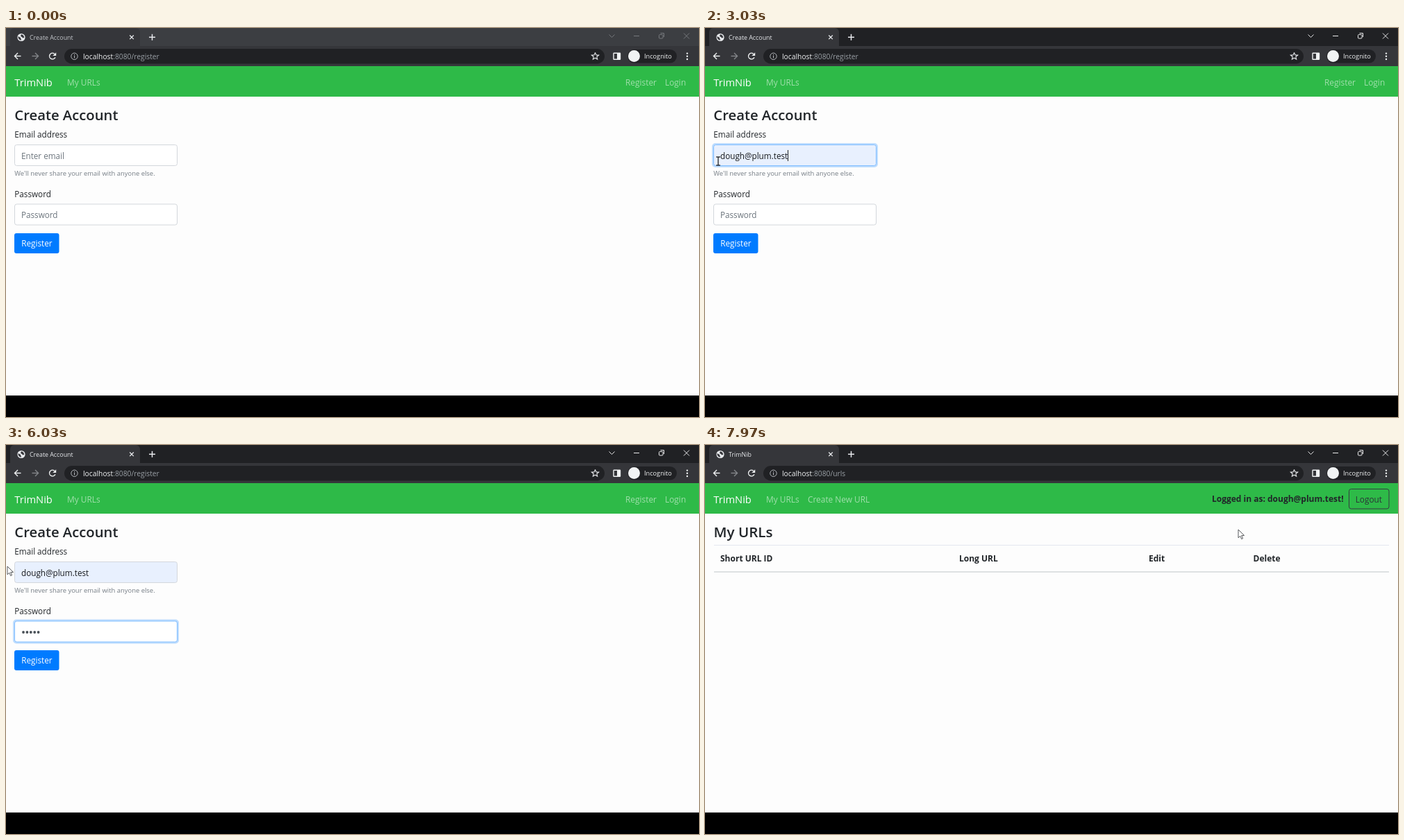
An HTML page with a canvas that plays this animation: 998x561 px, repeating every 8000 ms.

```html
<!DOCTYPE html>
<html lang="en">
<head>
<meta charset="utf-8">
<title>Create Account</title>
<style>
html, body { margin: 0; width: 100%; height: 100%; overflow: hidden; background: #000; }
canvas { display: block; }
</style>
</head>
<body>
<canvas id="stage" width="998" height="561"></canvas>
<script>
const ctx = document.getElementById('stage').getContext('2d');
const LOOP = 8000;
const BRAND = 'TrimNib';
const EMAIL = 'dough@plum.test';
const FONT = '"Open Sans", "Noto Sans", sans-serif';
const INK = '#212529', WHITE = '#fff', BAR = '#35363a', DARK = '#202124';
const BODY = 11.7;

// Moments of the story, in ms
const APPEAR = 30, CLICK_EMAIL = 1100, FILL = 2900, CLICK_PASS = 3580;
const EMAIL_KEYS = [1330, 1400];
const PASS_KEYS = [4570, 4770, 4900, 5030, 5120];
const SUBMIT = 6330, COMMIT = 6530, LOADED = 6840;

// Pointer stops: time, x, y
const PATH = [
  [30, 5, 201], [170, 8, 199], [1030, 8, 199], [1170, 24, 185], [1500, 25, 183],
  [2370, 25, 183], [2600, 19, 192], [3330, 19, 192], [3570, 35, 272], [3620, 36, 271],
  [3770, 36, 232], [4130, 2, 175], [6030, 2, 175], [6270, 40, 313], [6330, 40, 313],
  [6600, 197, 103], [6850, 230, 120], [6870, 230, 120], [7090, 420, 140],
  [7660, 926, 84], [7690, 926, 84], [7970, 768, 122]
];

const clamp = v => Math.max(0, Math.min(1, v));
const fade = (t, start, len) => clamp((t - start) / len);
const ease = p => p * p * (3 - 2 * p);
const mix = (a, b, p) => a.map((v, i) => Math.round(v + (b[i] - v) * p));
const rgb = c => `rgb(${c.join()})`;

function text(str, x, y, size, color, weight = 400) {
  ctx.font = `${weight} ${size}px ${FONT}`;
  ctx.fillStyle = color;
  ctx.fillText(str, x, y);
  return ctx.measureText(str).width;
}

function rect(x, y, w, h, color) {
  ctx.fillStyle = color;
  ctx.fillRect(x, y, w, h);
}

function box(x, y, w, h, r, fill, stroke, width = 1) {
  ctx.beginPath();
  ctx.roundRect(x, y, w, h, r);
  if (fill) { ctx.fillStyle = fill; ctx.fill(); }
  if (stroke) { ctx.strokeStyle = stroke; ctx.lineWidth = width; ctx.stroke(); }
}

function disc(x, y, r, color) {
  ctx.beginPath();
  ctx.arc(x, y, r, 0, 7);
  ctx.fillStyle = color;
  ctx.fill();
}

function arc(x, y, r, from, to, color, width) {
  ctx.beginPath();
  ctx.arc(x, y, r, from, to);
  ctx.strokeStyle = color;
  ctx.lineWidth = width;
  ctx.stroke();
}

// Flat list of coordinates
function trace(p) {
  ctx.beginPath();
  for (let i = 0; i < p.length; i += 2) ctx.lineTo(p[i], p[i + 1]);
}

function line(color, width, ...p) {
  trace(p);
  ctx.strokeStyle = color;
  ctx.lineWidth = width;
  ctx.stroke();
}

function shape(color, ...p) {
  trace(p);
  ctx.closePath();
  ctx.fillStyle = color;
  ctx.fill();
}

function cross(x, y, r, color, width) {
  line(color, width, x - r, y - r, x + r, y + r);
  line(color, width, x - r, y + r, x + r, y - r);
}

function backArrow(x, y, dir, color) {
  line(color, 1.4, x - 4.5, y, x + 4.5, y);
  line(color, 1.4, x, y - 4.5, x + dir * 4.5, y, x, y + 4.5);
}

function globe(x, y) {
  disc(x, y, 5.6, '#e8eaed');
  shape(BAR, x - 4.4, y - 1.5, x - 1, y + .4, x - .6, y + 2, x + .2, y + 4.3, x - 2.4, y + 3.4, x - 4.4, y + 1);
  shape(BAR, x, y - 4.4, x + 3, y - 3, x + 4.3, y, x + 2.6, y + 1, x + .8, y - .6, x - 1, y - 1.8);
}

function star(x, y) {
  const p = [];
  for (let i = 0; i <= 10; i++) {
    const r = i % 2 ? 2.4 : 5.4, a = i * Math.PI / 5 - Math.PI / 2;
    p.push(x + r * Math.cos(a), y + r * Math.sin(a));
  }
  line('#e8eaed', 1.1, ...p);
}

function browser(t) {
  const active = fade(t, CLICK_EMAIL, 150);
  const loading = t >= SUBMIT && t < LOADED;
  const icon = rgb(mix([118, 121, 125], [235, 235, 236], active));
  const label = rgb(mix([196, 199, 203], [232, 234, 237], active));

  rect(0, 0, 998, 27, rgb(mix([60, 62, 66], [32, 33, 36], active)));
  box(6, 0, 187, 30, [6, 6, 0, 0], BAR);
  rect(0, 26, 998, 29, BAR);

  if (loading) {
    const a = (t - SUBMIT) / 140 + 2;
    arc(22, 13.5, 5, a, a + 1.9, '#9aa0a6', 1.4);
  } else globe(22, 13.5);
  const title = t < COMMIT ? 'Create Account' : t < LOADED ? 'localhost:8080/urls' : BRAND;
  text(title, 34, 16.7, 8.85, label);
  cross(181, 13.3, 2.8, '#e8eaed', 1.3);
  line('#e8eaed', 1.5, 206, 13.3, 215, 13.3);
  line('#e8eaed', 1.5, 210.5, 8.8, 210.5, 17.8);

  line(icon, 1, 868.5, 9.5, 872.5, 13.5, 876.5, 9.5);
  line(icon, 1, 904, 11.5, 912, 11.5);
  box(940.5, 9.5, 5.5, 5.5, 1, null, icon);
  line(icon, 1, 942.5, 7.5, 947.5, 7.5, 947.5, 13);
  cross(980, 11.5, 4, icon, 1);

  backArrow(17, 40.5, -1, '#f1f3f4');
  backArrow(42, 40.5, 1, '#85878b');
  if (loading) cross(67, 40.5, 4, '#f1f3f4', 1.6);
  else {
    arc(67, 40.5, 4.4, .45, 5.4, '#f1f3f4', 1.4);
    shape('#f1f3f4', 72.2, 35.2, 72.2, 40, 67.4, 40);
  }

  box(84, 30, 778, 21.5, 10.7, DARK);
  arc(98.5, 40.8, 4.7, 0, 7, '#b6b9be', 1);
  rect(98, 40, 1.1, 3.4, '#b6b9be');
  rect(98, 38, 1.1, 1.2, '#b6b9be');
  const w = text('localhost', 111, 44.5, 10.3, '#f1f3f4');
  text(t < COMMIT ? ':8080/register' : ':8080/urls', 111 + w, 44.5, 10.3, '#9aa0a6');
  star(848.5, 40.8);
  box(875, 36.3, 9.5, 9, .5, null, '#f1f3f4', 1.4);
  rect(880, 36, 4.5, 9.5, '#f1f3f4');
  box(895, 31, 71, 19.5, 9.7, DARK);
  disc(904.5, 40.5, 8.5, '#f1f3f4');
  text('Incognito', 919, 43.9, 9.2, '#f1f3f4');
  for (const y of [36.6, 40.8, 45]) disc(981, y, 1.2, '#f1f3f4');
}

function nav(links, right) {
  rect(0, 55, 998, 44, '#2eba48');
  const dim = 'rgba(255,255,255,.55)';
  text(BRAND, 12.3, 83.5, 14.7, WHITE);
  text('My URLs', 88, 82.6, 11.9, dim);
  if (links) text('Create New URL', 148, 82.6, 11.9, dim);
  if (right) {
    text('Register', 892, 82.6, 11.9, dim);
    text('Login', 949, 82.6, 11.9, dim);
  }
}

function field(y, focus, fill) {
  if (focus > 0) {
    box(10, y - 2.5, 239, 35, 5, `rgba(0,123,255,${.25 * focus})`);
  }
  box(12.5, y, 234, 30, 3, fill, rgb(mix([211, 215, 220], [128, 189, 255], focus)));
}

// Solid for half a second after each key, then blinking
function caret(t, since, x, y) {
  if (Math.floor((t - since) / 500) % 2 === 0) rect(Math.round(x), y - 8, 1, 16, '#222');
}

const keysBy = (keys, t) => keys.filter(k => t >= k).length;

function form(t, pointer) {
  nav(false, true);
  text('Create Account', 12.3, 133.3, 20.3, INK, 600);
  text('Email address', 12.3, 158.3, BODY, INK);

  const filled = t >= FILL;
  const onEmail = fade(t, CLICK_EMAIL, 150) * (1 - fade(t, CLICK_PASS, 150));
  field(168.5, onEmail, filled ? '#e8f0fe' : WHITE);
  const typed = filled ? EMAIL : EMAIL.slice(0, keysBy(EMAIL_KEYS, t));
  let w = 0;
  if (typed) w = text(typed, 22, 189, BODY, filled ? '#16181b' : '#5a6168');
  else text('Enter email', 22, 189, BODY, '#6c757d');
  if (t >= CLICK_EMAIL && t < CLICK_PASS) {
    const since = filled ? FILL : t >= EMAIL_KEYS[0] ? EMAIL_KEYS[1] : CLICK_EMAIL;
    caret(Math.max(t, since), since, 22 + w, 184);
  }
  text('We\'ll never share your email with anyone else.', 12.3, 213, 9.43, '#757d85');

  text('Password', 12.3, 243.6, BODY, INK);
  field(254, fade(t, CLICK_PASS, 150), WHITE);
  const n = keysBy(PASS_KEYS, t);
  if (!n) text('Password', 22, 274, BODY, '#6c757d');
  for (let i = 0; i < n; i++) disc(25 + i * 5.4, 270, 1.9, '#495057');
  if (t >= CLICK_PASS) caret(t, n ? PASS_KEYS[n - 1] : CLICK_PASS, 22 + n * 5.3, 269);

  const hover = overButton(pointer);
  if (t >= SUBMIT - 40) box(9.5, 293.5, 69, 34, 5, 'rgba(0,123,255,.4)');
  box(12, 296, 64.5, 29, 3, hover ? '#0069d9' : '#007bff');
  text('Register', 22.3, 315.4, BODY, WHITE);
}

function list(t) {
  nav(true, false);
  text(`Logged in as: ${EMAIL}!`, 730, 82.4, 12, INK, 700);
  const lit = 1 - fade(t, COMMIT + 60, 150);
  box(927.5, 63.5, 57.5, 28.5, 3, `rgba(240,240,240,${lit})`, '#343a40');
  text('Logout', 936.7, 82.6, 11.8, '#2b3137');

  text('My URLs', 12.5, 133.3, 20.6, INK, 600);
  rect(13, 144, 972, 1, '#e4e6ef');
  rect(13, 182, 972, 2, '#dee1e2');
  const heads = { 'Short URL ID': 22, 'Long URL': 366, 'Edit': 639, 'Delete': 789.5 };
  for (const name in heads) text(name, heads[name], 168, 12, INK, 700);
}

function pointerAt(t) {
  if (t >= PATH[PATH.length - 1][0]) return PATH[PATH.length - 1].slice(1);
  const i = Math.max(1, PATH.findIndex(k => k[0] > t));
  const [t0, x0, y0] = PATH[i - 1], [t1, x1, y1] = PATH[i];
  const p = ease(clamp((t - t0) / (t1 - t0)));
  return [x0 + (x1 - x0) * p, y0 + (y1 - y0) * p];
}

const overButton = ([x, y]) => x > 12 && x < 76 && y > 296 && y < 325;
const overText = ([x, y]) => x > 12 && x < 247 && y > 166 && y < 284 && !(y > 200 && y < 230);

function pointer(pos, onForm) {
  ctx.save();
  ctx.translate(...pos);
  ctx.lineJoin = 'round';
  if (onForm && overButton(pos)) {
    box(-3, 5, 10, 9, 3, WHITE, '#222');
    box(-1.5, 0, 3, 9, 1.5, WHITE, '#222');
    rect(-1, 6, 2, 4, WHITE);
  } else if (onForm && overText(pos)) {
    line('#111', 1.2, 0, -6, 0, 6);
    for (const s of [-6, 6]) line('#111', 1.2, -3, s, 3, s);
  } else {
    trace([0, 0, 0, 11.8, 2.8, 9.3, 4.7, 13.6, 6.5, 12.8, 4.7, 8.6, 8.5, 8.4]);
    ctx.closePath();
    ctx.fillStyle = WHITE;
    ctx.fill();
    ctx.strokeStyle = '#44474a';
    ctx.lineWidth = .9;
    ctx.stroke();
  }
  ctx.restore();
}

function draw(now) {
  const t = now % LOOP;
  const pos = pointerAt(t);
  const onForm = t < COMMIT;
  rect(0, 0, 998, 561, '#000');
  rect(0, 55, 998, 475, '#fdfdfd');
  browser(t);
  if (onForm) form(t, pos);
  else list(t);
  if (t >= APPEAR) pointer(pos, onForm);
  requestAnimationFrame(draw);
}
requestAnimationFrame(draw);
</script>
</body>
</html>
```
